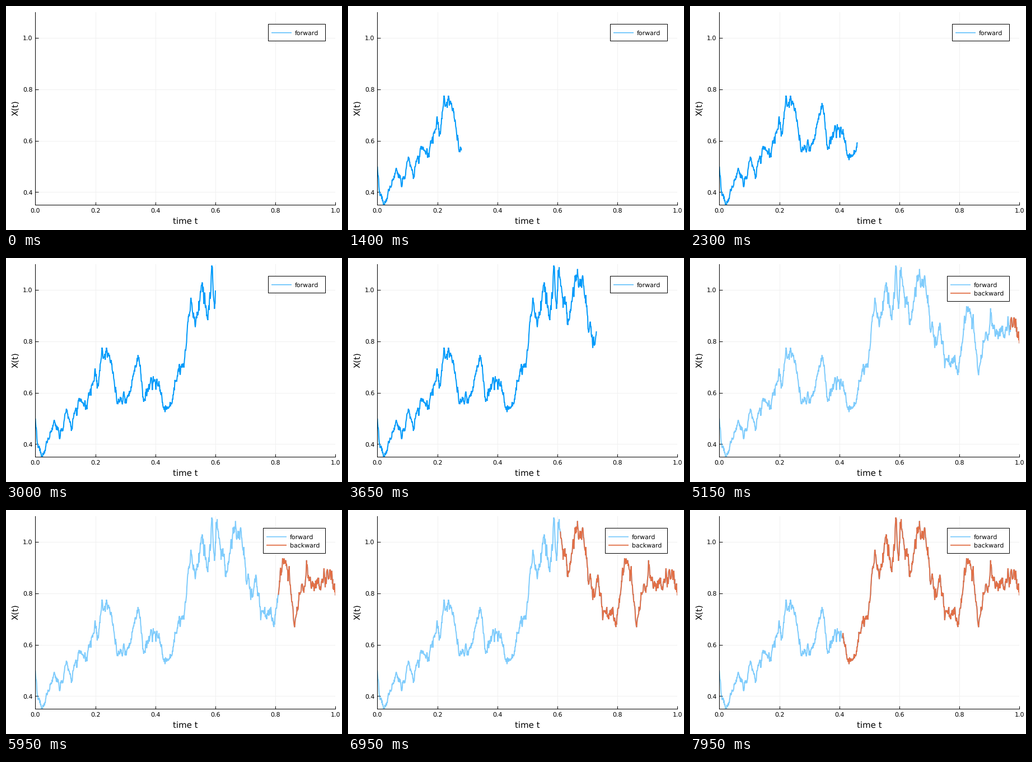
Recreate the animation shown at these times as a matplotlib script. Size 600x400 px, loop 8000 ms.

```python
import numpy as np
import matplotlib.pyplot as plt
from matplotlib.animation import FuncAnimation
from matplotlib.patches import Rectangle

W, H, DPI = 600, 400, 100
PX = 72 / DPI  # points per pixel
BLUE, RED, GRID = "#009AFA", "#E26F46", "#F0F0F0"
LEFT, RIGHT, TOP, BOTTOM = 52.45, 588.2, 11.4, 355.4
STEP, FORWARD, FRAMES = 10, 100, 160

plt.rcParams.update({"font.family": "DejaVu Sans", "text.hinting": "none",
                     "text.hinting_factor": 1})

# main turning points (t, X) of the walk
TURNS = [
    (0, 0.5), (0.006, 0.41), (0.022, 0.35), (0.036, 0.4), (0.062, 0.48),
    (0.083, 0.44), (0.103, 0.525), (0.122, 0.455), (0.146, 0.575),
    (0.172, 0.545), (0.199, 0.68), (0.206, 0.63), (0.22, 0.72),
    (0.239, 0.765), (0.25, 0.71), (0.273, 0.56), (0.305, 0.57),
    (0.342, 0.74), (0.361, 0.57), (0.387, 0.68), (0.412, 0.63),
    (0.433, 0.525), (0.468, 0.64), (0.495, 0.72), (0.515, 0.92),
    (0.534, 0.88), (0.556, 1.035), (0.575, 0.87), (0.588, 1.06),
    (0.597, 0.95), (0.606, 1.05), (0.637, 0.88), (0.648, 0.99),
    (0.678, 1.07), (0.718, 0.78), (0.735, 0.86), (0.75, 0.74),
    (0.797, 0.7), (0.82, 0.9), (0.838, 0.92), (0.864, 0.68),
    (0.88, 0.81), (0.907, 0.9), (0.917, 0.83), (0.95, 0.835),
    (0.977, 0.88), (1, 0.82),
]


def sample_path():
    """Turning points joined by lines, with noise that scales with X."""
    rng = np.random.default_rng(4)
    t = np.linspace(0, 1, 1001)
    noise = np.zeros(t.size)
    for k in range(1, t.size):
        noise[k] = 0.75 * noise[k - 1] + rng.normal(0, 0.016)
    return t, np.interp(t, *zip(*TURNS)) * (1 + noise)


fig = plt.figure(figsize=(W / DPI, H / DPI), dpi=DPI, facecolor="white")

# overlay in pixel coordinates for text and legend
over = fig.add_axes([0, 0, 1, 1], zorder=2)
over.set(xlim=(0, W), ylim=(H, 0))
over.axis("off")

ax = fig.add_axes([LEFT / W, 1 - BOTTOM / H,
                   (RIGHT - LEFT) / W, (BOTTOM - TOP) / H])
ax.set(xlim=(0, 1), ylim=(0.35, 1.1))
ax.set_xticks(np.arange(6) / 5)
ax.set_yticks([0.4, 0.6, 0.8, 1.0])
ax.set_axisbelow(True)
ax.grid(color=GRID, lw=PX)
ax.tick_params(direction="in", width=PX, labelbottom=False, labelleft=False)
ax.tick_params(axis="x", length=5 * PX)
ax.tick_params(axis="y", length=6 * PX)
for side in ("top", "right"):
    ax.spines[side].set_visible(False)
for side in ("left", "bottom"):
    ax.spines[side].set_linewidth(PX)


def label(x, y, s, size=11.1, ha="left", rot=0):
    return over.text(x, y, s, fontsize=size * PX, ha=ha, va="baseline",
                     rotation=rot, rotation_mode="anchor")


for v in ax.get_xticks():
    label(LEFT + v * (RIGHT - LEFT), 369, f"{v:.1f}", ha="center")
for v in ax.get_yticks():
    label(47.5, TOP + (1.1 - v) / 0.75 * (BOTTOM - TOP) + 4, f"{v:.1f}",
          ha="right")
label(320.5, 389, "time t", 14.9, "center")
label(21.5, 182, "X(t)", 14.9, "center", 90)


def legend(left, bottom, entries, width):
    box = Rectangle((left, 32), 570 - left, bottom - 32,
                    fc="white", ec="black", lw=PX)
    parts = [over.add_patch(box)]
    for i, (name, color, alpha) in enumerate(entries):
        y = 47.8 + 15 * i
        parts += over.plot([left + 6, left + 42], [y, y], color=color,
                           alpha=alpha, lw=width * PX, snap=False,
                           solid_capstyle="butt")
        parts.append(label(left + 47.5, y + 4.2, name))
    return parts


legend_one = legend(468, 62, [("forward", BLUE, 1)], 1)
legend_two = legend(459, 77,
                    [("forward", BLUE, 0.5), ("backward", RED, 1)], 1.8)

style = dict(lw=2 * PX, solid_capstyle="butt", solid_joinstyle="miter")
ahead, = ax.plot([], [], color=BLUE, **style)
back, = ax.plot([], [], color=RED, **style)
T, X = sample_path()


def draw(n):
    turned = n >= FORWARD
    end = len(T) if turned else STEP * n + 1
    start = len(T) - 1 - STEP * (n - FORWARD) if turned else len(T)
    ahead.set_data(T[:end], X[:end])
    ahead.set_alpha(0.5 if turned else 1)
    back.set_data(T[start:], X[start:])
    for part in legend_one:
        part.set_visible(not turned)
    for part in legend_two:
        part.set_visible(turned)
    return [ahead, back, *legend_one, *legend_two]


anim = FuncAnimation(fig, draw, frames=FRAMES, interval=50,
                     init_func=lambda: draw(0), repeat=True, repeat_delay=0)
plt.show()
```
